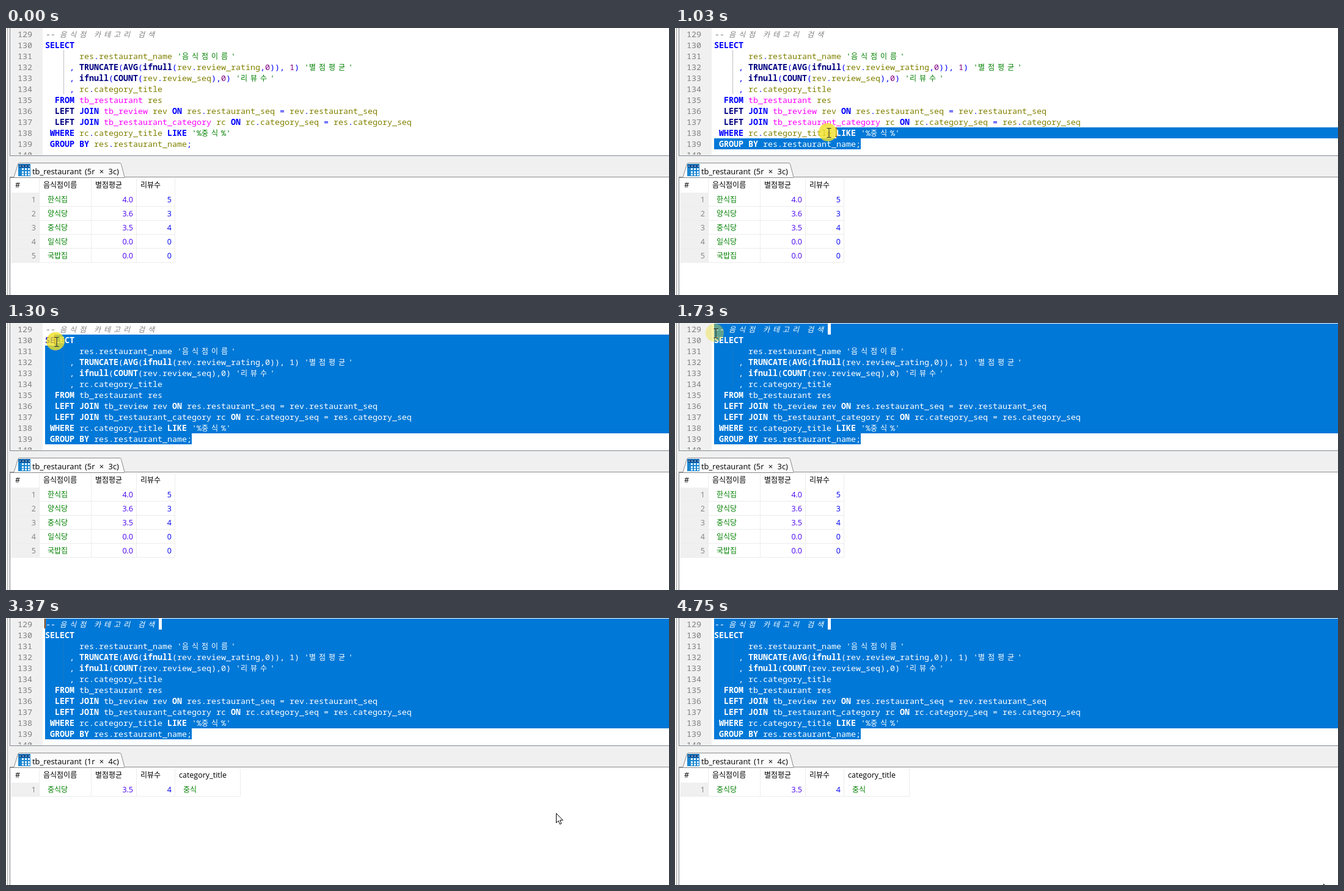
An HTML page that plays this animation: 1085x438 px, repeating every 4.82 s.

```html
<!DOCTYPE html>
<html lang="ko">
<head>
<meta charset="utf-8">
<title>SQL query</title>
<style>
html, body { margin: 0; width: 100%; height: 100%; overflow: hidden; background: #fff; }
#stage { position: absolute; left: 0; top: 0; width: 1085px; height: 438px; overflow: hidden; }
#stage > svg, .code, .nums { position: absolute; left: 0; top: 0; }
.code, .nums {
  width: 1085px; height: 208px; overflow: hidden; white-space: pre;
  font: 13.333px/18px "Noto Sans Mono", "DejaVu Sans Mono", monospace;
}
.line { position: absolute; left: 64px; height: 18px; }
.nums .line { left: 19px; color: #808080; }
.h { display: inline-block; width: 16px; font: 12px/12px "Noto Sans CJK KR", "Noto Sans CJK", sans-serif; }
.guide {
  position: absolute; left: 94px; top: 37px; width: 1px; height: 72px;
  background: repeating-linear-gradient(#808080 0 1px, transparent 1px 2px);
}
.note { color: #808080; font-style: italic; }
.note .h { font-style: italic; }
.str { color: #008000; }
.fn { color: #000080; font-weight: bold; }
.key { color: #0000ff; font-weight: bold; }
.tab { color: #ff00ff; }
.num { color: #800080; }
.id { color: #808000; }
.op { color: #0000ff; }
#picked { background: #0078d7; }
#picked span { color: #fff; }
#picked .guide { opacity: .35; }
.gap { position: absolute; left: 250px; top: 1px; width: 5px; height: 18px; background: #fff; }
text { font: 12.5px "Open Sans", "Noto Sans CJK KR", sans-serif; }
text.ko { font: 12px "Noto Sans CJK KR", "Noto Sans CJK", sans-serif; }
text.title { font-size: 12.9px; }
</style>
</head>
<body>
<div id="stage">
  <svg width="1085" height="438">
    <path fill="#f0f0f0" d="M3 0H60V209H1085V245H3Z M3 245H6V438H3Z"/>
    <path fill="#a0a0a0" d="M2 0H3V438H2Z"/>
    <path fill="#828790" d="M6 0H7V209H1085V210H6Z"/>
    <path fill="#fff" d="M7 246H1085V438H7Z"/>
    <path fill="#828790" d="M6 245H7V438H6Z"/>
    <path fill="#fbfbfb" stroke="#8c8c8c" d="M6 244.5H13L19.5 223.5Q20 221.5 22 221.5H186Q188 221.5 188.5 223.5L194 244.5"/>
    <path stroke="#8c8c8c" d="M194 244.5H1085M6 245.5H194"/>
    <path fill="#1b86d0" d="M20 223H40V243H20Z"/>
    <path fill="#0b4f91" d="M21 224H39V229H21Z"/>
    <path stroke="#fff" stroke-dasharray="2 3" d="M22 226.5H39"/>
    <path fill="#e8f5ff" d="M26 230h3v3h-3zm5 0h3v3h-3zm5 0h3v3h-3zM26 235h3v3h-3zm5 0h3v3h-3zm5 0h3v3h-3zM26 239h3v3h-3zm5 0h3v3h-3zm5 0h3v3h-3z"/>
    <text class="title" x="43" y="240">tb_restaurant</text>
    <text class="title" id="size" x="129" y="240" word-spacing="4"></text>
    <g id="before"></g>
    <g id="after"></g>
  </svg>
  <div class="nums" id="nums"></div>
  <div class="code" id="plain"></div>
  <div class="code" id="picked"></div>
  <svg width="1085" height="438">
    <g id="caret"><path fill="#000" d="M-1 0h1v16h-1z"/><path fill="#ff8728" d="M0 0h1v16h-1z"/></g>
    <g id="mouse">
      <circle id="halo" cx="-2" cy="-1" r="15" fill="#f0e028"/>
      <path id="beam" fill="none" stroke="#222" d="M-3.5 -7.5H-1Q0 -7.5 0 -6.5V6.5Q0 7.5 -1 7.5H-3.5M3.5 -7.5H1Q0 -7.5 0 -6.5M3.5 7.5H1Q0 7.5 0 6.5"/>
      <path id="arrow" fill="#fff" stroke="#000" d="M.5 .5V16L4 12.7 6.4 18.3 8.9 17.2 6.5 11.8H11.4Z"/>
      <circle id="ring" cx="13" cy="0" r="5.5" fill="none" stroke="#38a8e8" stroke-width="3" stroke-dasharray="26 8.6"/>
    </g>
  </svg>
</div>
<script>
const LOOP = 4820, ROW = 18, TOP = 1, LEFT = 64, CELL = 8;
const $ = id => document.getElementById(id);

const sql = [
  "-- 음식점 카테고리 검색",
  "SELECT",
  "       res.restaurant_name '음식점이름'",
  "     , TRUNCATE(AVG(ifnull(rev.review_rating,0)), 1) '별점평균'",
  "     , ifnull(COUNT(rev.review_seq),0) '리뷰수'",
  "     , rc.category_title",
  "  FROM tb_restaurant res",
  "  LEFT JOIN tb_review rev ON res.restaurant_seq = rev.restaurant_seq",
  "  LEFT JOIN tb_restaurant_category rc ON rc.category_seq = res.category_seq",
  " WHERE rc.category_title LIKE '%중식%'",
  " GROUP BY res.restaurant_name;"
];
const kinds = [
  ["note", "--.*"],
  ["str", "'[^']*'"],
  ["fn", "\\b(?:TRUNCATE|AVG|ifnull|COUNT|LEFT)\\b"],
  ["key", "\\b(?:SELECT|FROM|JOIN|ON|WHERE|LIKE|GROUP|BY)\\b"],
  ["tab", "\\btb_\\w+"],
  ["num", "\\b\\d+"],
  ["id", "\\w+"],
  ["op", "[^\\s\\w]"]
];
const lexer = new RegExp(kinds.map(k => `(${k[1]})`).join("|"), "g");
const hangul = s => s.replace(/[가-힣]/g, '<span class="h">$&</span>');
const paint = s => s.replace(lexer, (m, ...g) => {
  const i = g.slice(0, kinds.length).findIndex(v => v !== undefined);
  return `<span class="${kinds[i][0]}">${hangul(m)}</span>`;
});
const lineAt = (i, html) => `<div class="line" style="top:${TOP + i * ROW}px">${html}</div>`;

const code = sql.map((s, i) => lineAt(i, paint(s))).join("") + '<div class="guide"></div>';
$("plain").innerHTML = code;
$("picked").innerHTML = code + '<div class="gap"></div>';
$("nums").innerHTML = Array.from({ length: 12 }, (_, i) => lineAt(i, 129 + i)).join("");

// Result grids
const edges = [54, 139, 213, 276, 383];
const label = (x, y, s, fill = "#000", anchor = "start") =>
  `<text class="${/[가-힣]/.test(s) ? "ko" : ""}" x="${x}" y="${y}" fill="${fill}" text-anchor="${anchor}">${s}</text>`;

function grid(heads, rows) {
  const right = edges[heads.length], bottom = 269 + rows.length * 23;
  let out = `<path fill="#f0f0f0" d="M8 270H54V${bottom + 1}H8Z"/>`;
  let d = "";
  for (const x of edges.slice(0, heads.length + 1)) d += `M${x + .5} 247V${bottom + 1}`;
  for (let y = 292; y <= bottom; y += 23) d += `M8 ${y + .5}H${right}`;
  out += `<path stroke="#ececec" fill="none" d="${d}"/>` + label(15, 262, "#");
  heads.forEach((h, i) => out += label(edges[i] + 7, 262, h));
  rows.forEach(([name, avg, count, kind], i) => {
    const y = 286 + i * 23;
    out += label(49, y, i + 1, "#808080", "end") + label(68, y, name, "#008000") +
      label(208, y, avg, "#4800f0", "end") + label(271, y, count, "#0000f0", "end");
    if (kind) out += label(290, y, kind, "#008000");
  });
  return out;
}
const heads = ["음식점이름", "별점평균", "리뷰수"];
$("before").innerHTML = grid(heads, [
  ["한식집", "4.0", 5], ["양식당", "3.6", 3], ["중식당", "3.5", 4], ["일식당", "0.0", 0], ["국밥집", "0.0", 0]
]);
$("after").innerHTML = grid([...heads, "category_title"], [["중식당", "3.5", 4, "중식"]]);

// Pointer path: time, x, y
const path = [
  [100, 905, 428], [190, 840, 380], [310, 600, 275], [430, 420, 210], [520, 377, 196],
  [640, 377, 196], [650, 379, 197], [700, 381, 199], [910, 381, 199],
  [1030, 252, 172], [1180, 152, 82], [1285, 83, 31], [1300, 83, 31], [1380, 67, 17],
  [3190, 67, 17], [3250, 300, 100], [3310, 680, 235], [3370, 900, 320],
  [3470, 900, 320], [3570, 911, 324], [3600, 925, 345], [3690, 985, 395], [3780, 1030, 438],
  [4650, 1061, 436], [4820, 1061, 436]
];
function pointer(t) {
  const i = path.findIndex(p => p[0] > t);
  if (i <= 0) return path[i ? path.length - 1 : 0].slice(1);
  const [a, b] = [path[i - 1], path[i]], k = (t - a[0]) / (b[0] - a[0]);
  return [a[1] + (b[1] - a[1]) * k, a[2] + (b[2] - a[2]) * k];
}

const caretFlips = [1550, 2090, 2590, 3070, 3600, 4110, 4650];
const show = (id, on) => $(id).style.display = on ? "" : "none";

function selectTo(t) {
  const [mx, my] = pointer(Math.min(t, 1400) - 12);
  const last = sql.length - 1;
  const row = Math.max(0, Math.min(last, Math.floor((my - TOP) / ROW)));
  const col = Math.max(0, Math.min(sql[row].length, Math.round((mx - LEFT) / CELL)));
  const x = LEFT + col * CELL, y = TOP + row * ROW;
  const end = LEFT + sql[last].length * CELL, base = TOP + last * ROW;
  const pts = row === last
    ? [[x, y], [end, y], [end, y + ROW], [x, y + ROW]]
    : [[x, y], [1085, y], [1085, base], [end, base], [end, base + ROW],
       [LEFT, base + ROW], [LEFT, y + ROW], [x, y + ROW]];
  $("picked").style.clipPath = `polygon(${pts.map(p => p.map(v => v + "px").join(" ")).join(",")})`;
  $("caret").setAttribute("transform", `translate(${x} ${y})`);
}

function draw(t) {
  const step = 10 + 30 * Math.floor((t - 10) / 30);
  const [x, y] = pointer(step).map(Math.round);
  const busy = t >= 2450 && t < 2590;
  const arrow = busy || y > 209;

  show("mouse", t >= 100 && t < 3780 || t >= 4700);
  $("mouse").setAttribute("transform", `translate(${x} ${y})`);
  show("arrow", arrow);
  show("beam", !arrow);
  show("ring", busy);
  $("ring").setAttribute("transform", `rotate(${(step - 2450) * 1.2} 13 0)`);
  $("halo").setAttribute("opacity", t < 870 || t >= 1830 ? 0 : t < 1730 ? .8 : .4);

  show("picked", t >= 870);
  show("caret", t >= 870 && caretFlips.filter(f => f <= t).length % 2 === 0);
  if (t >= 870) selectTo(step);

  const done = t >= 2520;
  show("before", t < 2450);
  show("after", done);
  $("size").textContent = done ? "(1r × 4c)" : "(5r × 3c)";
}

const start = performance.now();
function tick() {
  draw((performance.now() - start) % LOOP);
  requestAnimationFrame(tick);
}
tick();
</script>
</body>
</html>
```
